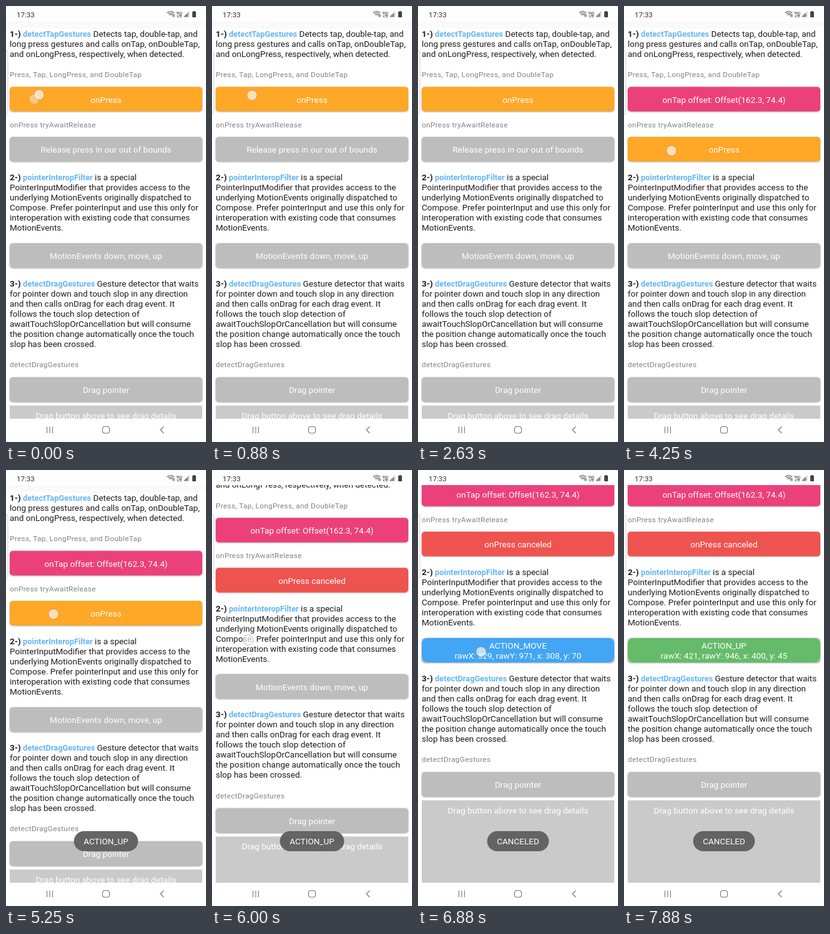
Write an HTML page with a canvas that moves like this. It is 320 px wide and 693 px high and loops after 8 s.

```html
<!DOCTYPE html>
<html lang="en">
<head>
<meta charset="utf-8">
<title>Gesture demo</title>
<style>
  html, body { margin: 0; width: 100%; height: 100%; overflow: hidden; background: #fff; }
  canvas { display: block; width: 320px; height: 693px; }
</style>
</head>
<body>
<canvas id="stage"></canvas>
<script>
const W = 320, H = 693, LOOP = 8000, STEP = 125;
const PX_PER_UNIT = 3.375; // device pixels per stage pixel
const canvas = document.getElementById('stage');
const ctx = canvas.getContext('2d');
const dpr = window.devicePixelRatio || 1;
canvas.width = W * dpr;
canvas.height = H * dpr;

const GRAY = '#bdbdbd', ORANGE = '#ffa726', PINK = '#ec407a', RED = '#ef5350',
      GREEN = '#66bb6a', BLUE = '#42a5f5';

const press = [ORANGE, 'onPress'];
const tapStates = [
  [0, ...press],
  [375, PINK, 'onTap offset: Offset(158.6, 42.2)'],
  [625, ...press],
  [1125, PINK, 'onLongPress offset: Offset(195.8, 45.5)'],
  [2000, ...press],
  [2750, PINK, 'onTap offset: Offset(162.3, 74.4)']
];
const releaseStates = [
  [0, GRAY, 'Release press in our out of bounds'],
  [3875, ...press],
  [4500, GREEN, 'onPress released'],
  [5000, ...press],
  [5500, RED, 'onPress canceled']
];
const motionStates = [
  [0, GRAY, 'MotionEvents down, move, up'],
  [6500, ORANGE, 'ACTION_DOWN'],
  [6625, BLUE, 'ACTION_MOVE'],
  [7625, GREEN, 'ACTION_UP']
];
const toasts = [[0, ''], [4500, 'ACTION_UP'], [6500, ''], [6625, 'CANCELED']];
const scrollKeys = [[5500, 0], [5875, 52.5], [6000, 52.5], [6375, 110]];

// Each touch is visible from its first key until its end time.
const drag = [[6500, 88, 292], [6875, 101, 289], [7625, 128.24, 281.6]];
const touches = [
  { end: 125, keys: [[-125, 45, 148], [0, 53, 141]] },
  { end: 1500, keys: [[625, 64, 142]] },
  { end: 2500, keys: [[2000, 54, 150]] },
  { end: 4500, keys: [[3875, 76, 230]] },
  { end: 5875, keys: [[5000, 76, 232], [5500, 76, 226], [5875, 70, 173]] },
  { end: 6375, keys: [[6000, 58, 270], [6375, 58, 212]] },
  { end: 7625, keys: drag }
];

const sections = [
  { y: 48.5, title: 'detectTapGestures', lines: [
    'Detects tap, double-tap, and',
    'long press gestures and calls onTap, onDoubleTap,',
    'and onLongPress, respectively, when detected.'] },
  { y: 277, title: 'pointerInteropFilter', lines: [
    'is a special',
    'PointerInputModifier that provides access to the',
    'underlying MotionEvents originally dispatched to',
    'Compose. Prefer pointerInput and use this only for',
    'interoperation with existing code that consumes',
    'MotionEvents.'] },
  { y: 445.5, title: 'detectDragGestures', lines: [
    'Gesture detector that waits',
    'for pointer down and touch slop in any direction',
    'and then calls onDrag for each drag event. It',
    'follows the touch slop detection of',
    'awaitTouchSlopOrCancellation but will consume',
    'the position change automatically once the touch',
    'slop has been crossed.'] }
];

const stateAt = (states, t) => states.filter(s => s[0] <= t).pop();

function valueAt(keys, t) {
  const next = keys.findIndex(k => k[0] > t);
  if (next === 0) return keys[0].slice(1);
  if (next < 0) return keys[keys.length - 1].slice(1);
  const a = keys[next - 1], b = keys[next], p = (t - a[0]) / (b[0] - a[0]);
  return a.slice(1).map((v, i) => v + (b[i + 1] - v) * p);
}

function text(str, x, y, size, color, { weight = 400, align = 'left', spacing = 0 } = {}) {
  ctx.font = `${weight} ${size}px Roboto, sans-serif`;
  ctx.letterSpacing = spacing + 'px';
  ctx.textAlign = align;
  ctx.fillStyle = color;
  ctx.fillText(str, x, y);
  return ctx.measureText(str).width;
}

function box(x, y, w, h, r, fill, shadow) {
  ctx.save();
  if (shadow) {
    ctx.shadowColor = 'rgba(0,0,0,.4)';
    ctx.shadowBlur = 2.5 * dpr;
    ctx.shadowOffsetY = 0.8 * dpr;
  }
  ctx.fillStyle = fill;
  ctx.beginPath();
  ctx.roundRect(x, y, w, h, r);
  ctx.fill();
  ctx.restore();
}

function line(points, width, color) {
  ctx.strokeStyle = color;
  ctx.lineWidth = width;
  ctx.beginPath();
  points.forEach(p => ctx.lineTo(...p));
  ctx.stroke();
}

const buttonText = (str, y) => text(str, 160, y, 13.6, '#fff', { align: 'center' });
const label = (str, y) => text(str, 6, y, 11.8, '#828282', { spacing: 0.32 });

function button(y, color, str) {
  box(6, y, 308, 39, 5, color, true);
  buttonText(str, y + 25);
}

function section({ y, title, lines }, index) {
  const ink = '#1c1c1c';
  let x = 6 + text(`${index + 1}-) `, 6, y, 13.5, ink, { weight: 700 });
  x += text(title, x, y, 12.8, '#64b5f6', { weight: 700 });
  text(' ' + lines[0], x, y, 13.5, ink);
  lines.slice(1).forEach((str, i) => text(str, 6, y + 16.06 * (i + 1), 13.5, ink));
}

function motionButton(t) {
  const [, color, str] = stateAt(motionStates, t);
  box(6, 377, 308, 39, 5, '#c4c4c4', true);
  box(6, 377, 308, 39, 9, color);
  if (color === GRAY) return buttonText(str, 402);
  const [cx, cy] = valueAt(drag, t);
  const rawX = Math.round((cx - 3.5) * PX_PER_UNIT);
  const rawY = Math.round((cy - 1.3) * PX_PER_UNIT);
  buttonText(str, 394);
  buttonText(`rawX: ${rawX}, rawY: ${rawY}, x: ${rawX - 21}, y: ${rawY - 901}`, 410);
}

function page(t) {
  const [scroll] = valueAt(scrollKeys, t);
  ctx.save();
  ctx.beginPath();
  ctx.rect(0, 24, W, 632);
  ctx.clip();
  if (!scroll) {
    ctx.fillStyle = 'rgba(0,0,0,.02)';
    ctx.beginPath();
    ctx.ellipse(160, 24, 230, 13, 0, 0, Math.PI);
    ctx.fill();
  }
  ctx.translate(0, -scroll);
  sections.forEach(section);
  label('Press, Tap, LongPress, and DoubleTap', 113);
  button(128.5, ...stateAt(tapStates, t).slice(1));
  label('onPress tryAwaitRelease', 192.5);
  button(208, ...stateAt(releaseStates, t).slice(1));
  motionButton(t);
  label('detectDragGestures', 574);
  button(590, GRAY, 'Drag pointer');
  box(6, 635, 308, 220, 0, '#cacaca');
  buttonText('Drag button above to see drag details', 655.5);
  ctx.restore();
}

function toast(t) {
  const [start, str] = stateAt(toasts, t);
  if (!str) return;
  ctx.save();
  ctx.globalAlpha = t === start ? 0.5 : 1;
  ctx.font = '400 13.4px Roboto, sans-serif';
  ctx.letterSpacing = '0.1px';
  const w = ctx.measureText(str).width + 31;
  box(160 - w / 2, 574, w, 32, 16, 'rgba(96,96,96,.97)');
  text(str, 160, 595, 13.4, '#fff', { align: 'center', spacing: 0.1 });
  ctx.restore();
}

function spot(x, y, alpha) {
  ctx.save();
  ctx.globalAlpha = alpha;
  ctx.beginPath();
  ctx.arc(x, y, 8, 0, 2 * Math.PI);
  ctx.fillStyle = 'rgba(255,255,255,.65)';
  ctx.fill();
  ctx.strokeStyle = 'rgba(150,145,140,.6)';
  ctx.lineWidth = 1;
  ctx.stroke();
  ctx.restore();
}

function pointer(t) {
  const touch = touches.find(s => t >= s.keys[0][0] && t < s.end);
  if (!touch) return;
  const [x, y] = valueAt(touch.keys, t);
  const [px, py] = valueAt(touch.keys, t - STEP);
  if (Math.hypot(x - px, y - py) > 6) spot(px, py, 0.6);
  spot(x, y, 1);
}

function statusBar() {
  const ink = '#444';
  text('17:33', 17, 17.5, 11.6, '#333');
  ctx.strokeStyle = ink;
  ctx.lineWidth = 1.2;
  [3, 5.5, 8].forEach(r => {
    ctx.beginPath();
    ctx.arc(263.5, 16.5, r, -Math.PI * 0.75, -Math.PI * 0.25);
    ctx.stroke();
  });
  line([[267, 13], [267, 17.5]], 1, ink);
  line([[269, 13], [269, 17.5]], 1, ink);
  text('Vo))', 277.5, 12.5, 5, ink, { weight: 700, align: 'center' });
  text('LTE', 277.5, 17.5, 5, ink, { weight: 700, align: 'center' });
  [2, 4, 6, 8.5].forEach((h, i) => box(285 + i * 2.2, 17.5 - h, 1.4, h, 0, i < 3 ? ink : '#bbb'));
  box(298, 9, 6, 9, 1, ink);
  box(299.5, 8, 3, 1.5, 0, ink);
}

function navBar() {
  const ink = '#777';
  [65.5, 70, 74.5].forEach(x => line([[x, 668.5], [x, 679]], 1.1, ink));
  ctx.beginPath();
  ctx.roundRect(154.5, 668.5, 11, 10.5, 3.5);
  ctx.stroke();
  line([[252.5, 668.5], [247, 673.8], [252.5, 679]], 1.2, ink);
}

function edgeHandle() {
  ctx.beginPath();
  ctx.roundRect(-4, 71, 7, 101, 2.5);
  ctx.fillStyle = 'rgba(255,255,255,.8)';
  ctx.fill();
  ctx.strokeStyle = '#c4c4c4';
  ctx.lineWidth = 0.8;
  ctx.stroke();
}

function draw(now) {
  const t = Math.floor((now % LOOP) / STEP) * STEP;
  ctx.setTransform(dpr, 0, 0, dpr, 0, 0);
  ctx.fillStyle = '#fff';
  ctx.fillRect(0, 0, W, H);
  page(t);
  statusBar();
  navBar();
  edgeHandle();
  toast(t);
  pointer(t);
}

const start = performance.now();
function tick() {
  draw(performance.now() - start);
  requestAnimationFrame(tick);
}
tick();
</script>
</body>
</html>
```
